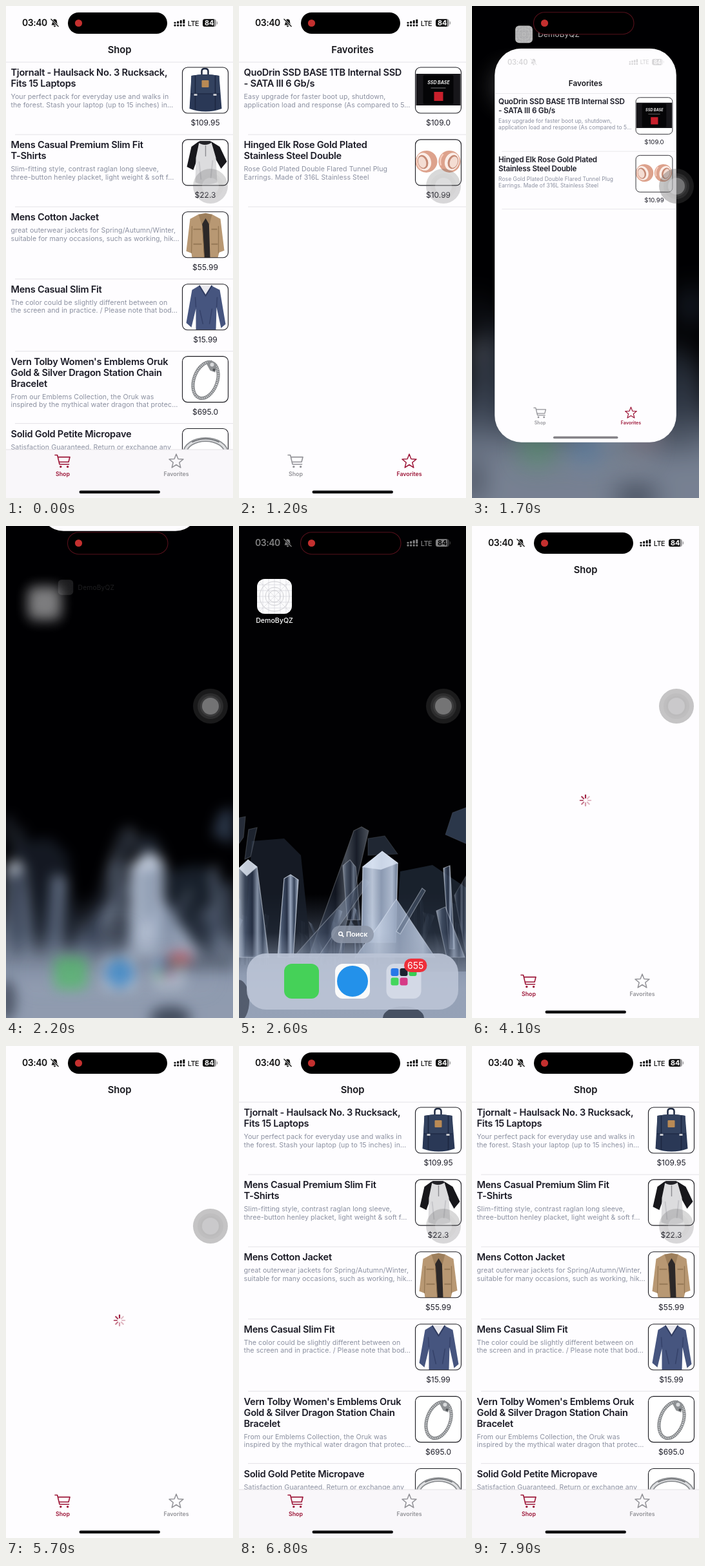
An HTML page that plays this animation: 352 px wide and 762 px high, repeating every 8 s.

```html
<!DOCTYPE html>
<html lang="en">
<head>
<meta charset="utf-8">
<title>Shop app</title>
<style>
html, body { margin: 0; width: 100%; height: 100%; overflow: hidden; background: #000; }
svg { display: block; width: 100vw; height: 100vh; font-family: Inter, sans-serif; }
.nav { font-size: 14.8px; font-weight: 600; letter-spacing: -.05px; fill: #16161c; }
.title { font-size: 14.6px; font-weight: 600; letter-spacing: -.26px; fill: #1b1b26; }
.desc { font-size: 10.6px; letter-spacing: .07px; fill: #8b90a0; }
.price { font-size: 12px; fill: #1b1b26; }
.tab { font-size: 8.8px; font-weight: 600; }
.mid { text-anchor: middle; }
</style>
</head>
<body>
<svg id="stage" viewBox="0 0 352 762" xmlns="http://www.w3.org/2000/svg"></svg>
<script>
const LOOP = 8000;
const RED = '#9c1537', GRAY = '#929297';

// Timeline, ms
const T = { fav: 1100, swipe: 1430, fling: 1980, gone: 2230, tap: 2900, open: 3524, loaded: 6300 };

const clamp = v => Math.max(0, Math.min(1, v));
const span = (t, a, b) => clamp((t - a) / (b - a));
const smooth = u => u * u * (3 - 2 * u);
const mix = (a, b, u) => a + (b - a) * u;

const text = (x, y, cls, s, extra = '') => `<text x="${x}" y="${y}" class="${cls}" ${extra}>${s}</text>`;
const path = (d, fill, extra = '') => `<path d="${d}" fill="${fill}" ${extra}/>`;
const line = (d, color, w, extra = '') => path(d, 'none', `stroke="${color}" stroke-width="${w}" ${extra}`);
const rect = (x, y, w, h, r, fill, extra = '') =>
  `<rect x="${x}" y="${y}" width="${w}" height="${h}" rx="${r}" fill="${fill}" ${extra}/>`;
const circle = (x, y, r, fill, extra = '') => `<circle cx="${x}" cy="${y}" r="${r}" fill="${fill}" ${extra}/>`;
const oval = (x, y, rx, ry, fill, extra = '') =>
  `<ellipse cx="${x}" cy="${y}" rx="${rx}" ry="${ry}" fill="${fill}" ${extra}/>`;

// Product pictures in a 71 x 71 box
const art = {
  backpack: line('M30 12V6Q30 2 35 2Q40 2 40 6V12', '#1f2a42', 2.5)
    + path('M14 13Q35 9 57 13L61 64Q36 73 11 64Z', '#2a3856')
    + path('M14 13Q35 9 57 13L58 40H13Z', '#33425f')
    + line('M20 13V66M51 13V66', '#1c2740', 1.5)
    + line('M13 41H58', '#1c2740', 1)
    + rect(30, 20, 11, 11, 1, '#b98a55')
    + rect(18, 41, 5, 3, 0, '#c3c6cc') + rect(48, 41, 5, 3, 0, '#c3c6cc'),
  raglan: path('M25 3L14 11L7 42L17 47L23 30L28 8ZM45 3L58 11L69 34L60 45L51 29L44 8Z', '#17171b')
    + path('M26 4Q35 10 45 4L52 28L54 66Q36 73 20 66L21 28Z', '#dcdcde')
    + path('M24 4Q35 12 46 4L43 2H27Z', '#232328')
    + line('M36 9V26', '#8b8b90', 1.4)
    + line('M26 34L29 62M47 32L44 60', '#c6c6ca', 2),
  jacket: path('M25 4L46 4L59 11L65 60L57 63L55 71H15L14 64L6 61L12 11Z', '#b89873')
    + path('M30 8L41 8L43 71H34Z', '#2c2828')
    + path('M25 4L36 2L46 4L42 20L36 10L30 20Z', '#9d7f5c')
    + line('M15 22L14 64M56 22L56 64', '#957854', 1.3)
    + line('M17 27H29M45 27H54M17 50H30M45 50H55', '#977a57', 2)
    + line('M31 22L34 71', '#8b6d4b', 1),
  pullover: path('M25 3L15 9L6 60L14 67L21 38L21 71H52L53 36L60 68L67 62L58 9L46 3Z', '#46557f')
    + path('M27 2L36 17L45 2Z', '#e9e9ee')
    + line('M26 2L36 18L46 2', '#303c61', 2)
    + line('M21 36L20 20M53 36L54 20M27 40L32 62M46 38L42 62', '#36436b', 1.6),
  bracelet: '<g transform="rotate(20 36 37)">'
    + oval(36, 37, 18, 29, 'none', 'stroke="#74777a" stroke-width="5"')
    + oval(36, 37, 18, 29, 'none', 'stroke="#c9cbcd" stroke-width="3.4" stroke-dasharray="1.6 1.2"') + '</g>'
    + path('M37 11L45 6L53 13L51 25L43 22Z', '#8d9093')
    + circle(46, 13, 3, '#d8dadc') + circle(49, 21, 2, '#4d5053'),
  band: oval(36, 38, 32, 21, 'none', 'stroke="#8c8f92" stroke-width="7"')
    + oval(36, 38, 32, 21, 'none', 'stroke="#dfe0e2" stroke-width="3.5"')
    + line('M15 21Q36 11 57 21', '#6b6e72', 1.5),
  drive: rect(1, 10, 69, 49, 0, '#17161a')
    + rect(12, 12, 47, 45, 2, '#050507')
    + text(36, 26, 'mid', 'SSD BASE', 'font-size="7" font-weight="700" font-style="italic" fill="#eee"')
    + line('M24 32H47', '#777', 1) + rect(29, 38, 14, 14, 0, '#c8202c'),
  plugs: [[17, -18], [53, 18]].map(([x, a]) => `<g transform="rotate(${a} ${x} 34)">`
    + oval(x, 34, 17, 17, '#dda28c') + oval(x + a / 5, 33, 11, 14, '#fbeee8')
    + oval(x + a / 3.4, 33, 8, 11, '#c58a75') + oval(x + a / 2.8, 33, 6, 9, '#f4ddd3')
    + line(`M${x - 13} 26Q${x - 17} 35 ${x - 11} 44`, '#f6cdbd', 2.5) + '</g>').join('')
};

const shop = [
  [['Tjornalt - Haulsack No. 3 Rucksack,', 'Fits 15 Laptops'],
    ['Your perfect pack for everyday use and walks in', 'the forest. Stash your laptop (up to 15 inches) in…'], '$109.95', 'backpack'],
  [['Mens Casual Premium Slim Fit', 'T-Shirts'],
    ['Slim-fitting style, contrast raglan long sleeve,', 'three-button henley placket, light weight &amp; soft f…'], '$22.3', 'raglan'],
  [['Mens Cotton Jacket'],
    ['great outerwear jackets for Spring/Autumn/Winter,', 'suitable for many occasions, such as working, hik…'], '$55.99', 'jacket'],
  [['Mens Casual Slim Fit'],
    ['The color could be slightly different between on', 'the screen and in practice. / Please note that bod…'], '$15.99', 'pullover'],
  [["Vern Tolby Women's Emblems Oruk", 'Gold &amp; Silver Dragon Station Chain', 'Bracelet'],
    ['From our Emblems Collection, the Oruk was', 'inspired by the mythical water dragon that protec…'], '$695.0', 'bracelet'],
  [['Solid Gold Petite Micropave'],
    ['Satisfaction Guaranteed. Return or exchange any', 'order within 30 days.'], '', 'band']
];
const favorites = [
  [['QuoDrin SSD BASE 1TB Internal SSD', '- SATA III 6 Gb/s'],
    ['Easy upgrade for faster boot up, shutdown,', 'application load and response (As compared to 5…'], '$109.0', 'drive'],
  [['Hinged Elk Rose Gold Plated', 'Stainless Steel Double'],
    ['Rose Gold Plated Double Flared Tunnel Plug', 'Earrings. Made of 316L Stainless Steel'], '$10.99', 'plugs']
];

function row([title, desc, price, pic], i) {
  const y = 87 + i * 111.9;
  const d = y + 40 + 17 * (title.length - 1);
  return title.map((s, k) => text(7.5, y + 21.3 + 17 * k, 'title', s)).join('')
    + desc.map((s, k) => text(7.5, d + 12.7 * k, 'desc', s)).join('')
    + `<g transform="translate(273.5 ${y + 8})">`
    + rect(0, 0, 71, 71, 8, '#fff') + `<g class="art">${art[pic]}</g>`
    + rect(0, 0, 71, 71, 8, 'none', 'stroke="#1c1c22" stroke-width="1.1"') + '</g>'
    + text(309, y + 98.2, 'price mid', price)
    + rect(14, y + 111.7, 338, .8, 0, '#dddbe0');
}

function status(c, inner) {
  let bars = '';
  for (let i = 0; i < 4; i++) {
    const x = 260.5 + i * 4.6, h = 2.5 + i * 1.3;
    bars += rect(x, 27.2 - h, 3, h, .8, c) + rect(x, 28.6, 3, 3, .8, c);
  }
  return text(25, 31.3, '', '03:40', `font-size="13.9" font-weight="600" letter-spacing="-.4" fill="${c}"`)
    + path('M70.5 29.5Q72 27.5 72 24.5Q72 20.5 75.5 20.2Q79 20.5 79 24.5Q79 27.5 80.5 29.5ZM73.7 30.5H77.3Q76.8 32.4 75.5 32.4Q74.2 32.4 73.7 30.5Z', c)
    + line('M69.5 20L81.5 32', inner, 2.6) + line('M69.5 20L81.5 32', c, 1.2)
    + bars + text(281.8, 30.6, '', 'LTE', `font-size="10.8" font-weight="500" letter-spacing="-.5" fill="${c}"`)
    + rect(305, 20.3, 21, 11.8, 3.6, c, 'opacity=".4"')
    + path('M308.6 20.3H322.5V32.1H308.6Q305 32.1 305 28.5V23.9Q305 20.3 308.6 20.3Z', c)
    + rect(326.8, 24, 1.4, 4.4, .7, c, 'opacity=".4"')
    + text(315.2, 30.2, 'mid', '84', `font-size="10.8" font-weight="700" fill="${inner}"`);
}

const star = 'M' + Array.from({ length: 10 }, (_, i) => {
  const a = -Math.PI / 2 + i * Math.PI / 5, r = i % 2 ? 5 : 11.6;
  return `${(264 + r * Math.cos(a)).toFixed(1)} ${(705.5 + r * Math.sin(a)).toFixed(1)}`;
}).join('L') + 'Z';

const tabs = (a, b) =>
  line('M76 695.5H79.6L83 709.8H97.5M80.2 698.6H99L97 706.3H82', a, 1.6, 'stroke-linejoin="round" stroke-linecap="round"')
  + circle(84.8, 713.6, 1.7, a) + circle(95.6, 713.6, 1.7, a)
  + text(88, 728, 'tab mid', 'Shop', `fill="${a}"`)
  + line(star, b, 1.5, 'stroke-linejoin="round"')
  + text(264, 728, 'tab mid', 'Favorites', `fill="${b}"`);

const spokes = Array.from({ length: 8 }, (_, i) =>
  `<path class="spoke" d="M176 421V416.8" stroke="${RED}" stroke-width="2.2" stroke-linecap="round" transform="rotate(${i * 45} 176 425)"/>`).join('');

const gridIcon = (x, y, s) => `<g transform="translate(${x} ${y}) scale(${s / 54})">`
  + rect(0, 0, 54, 54, 12, '#fbfbfc')
  + line('M9 0V54M18 0V54M27 0V54M36 0V54M45 0V54M0 9H54M0 18H54M0 27H54M0 36H54M0 45H54M3 3L51 51M51 3L3 51', '#d2d2d7', .6)
  + [9, 14, 23].map(r => circle(27, 27, r, 'none', 'stroke="#bdbdc3" stroke-width=".7"')).join('') + '</g>';

// Crystals: points, fill, opacity, edge opacity
const crystals = [
  ['20,488 70,484 96,510 112,665 8,665', '#1a212d', .8, 0],
  ['200,484 226,480 246,508 200,510', '#28313f', .8, .15],
  ['250,535 300,525 352,560 352,690 240,690', '#202937', .8, 0],
  ['352,436 331,444 320,478 352,492', '#303d52', .9, .1],
  ['0,452 10,450 7,482 0,492', '#4b586d', .5, .3],
  ['15,470 28,467 18,512 9,516', '#39465a', .5, .4],
  ['178,472 190,466 201,472 154,668 108,668', 'url(#ice)', .4, .7],
  ['161,526 172,517 181,528 188,610 168,610', 'url(#ice)', .5, .7],
  ['0,530 14,517 28,528 46,668 0,668', 'url(#ice)', .75, .8],
  ['0,530 14,517 28,528 12,542', '#eaf1fc', .8, .5],
  ['70,546 80,540 92,548 84,668 60,668', 'url(#ice)', .9, .8],
  ['194,546 202,552 122,668 84,668', 'url(#ice)', .45, .7],
  ['192,528 222,504 246,522 243,645 190,645', 'url(#pale)', .95, .8],
  ['192,528 222,504 246,522 220,532', '#dfe9f8', .75, .6],
  ['244,578 304,668 180,668 214,622', 'url(#pale)', .9, .6],
  ['284,561 289,565 250,632 244,628', '#54637b', .5, .9],
  ['317,530 327,526 334,655 326,655', 'url(#ice)', .8, .7],
  ['306,596 320,590 350,668 322,668', 'url(#ice)', .65, .6],
  ['334,572 352,542 352,662', 'url(#ice)', .4, .4]
].map(([p, f, o, e]) =>
  `<polygon points="${p}" fill="${f}" opacity="${o}" stroke="#e4edfa" stroke-opacity="${e}" stroke-width="1.2"/>`).join('');

// Small shards around the crystal feet
let seed = 11;
const rnd = () => (seed = seed * 16807 % 2147483647) / 2147483647;
const shards = Array.from({ length: 34 }, () => {
  const x = rnd() * 352, y = 575 + rnd() * 70, w = 3 + rnd() * 9, lean = (rnd() - .5) * 60;
  return `<polygon points="${x},${y} ${x + w},${y + 4} ${x + w + lean},680 ${x + lean},680" fill="url(#ice)" opacity="${.15 + rnd() * .4}"/>`;
}).join('');

const wall = rect(-60, -60, 472, 882, 0, '#010103')
  + rect(-60, 570, 472, 252, 0, 'url(#haze)') + shards + crystals
  + rect(-60, 630, 472, 192, 0, 'url(#floor)')
  + oval(0, 735, 16, 32, '#28303f', 'opacity=".6"') + oval(255, 762, 32, 18, '#323c4e', 'opacity=".8"');

const minis = [[235.5, 685, '#2878e8'], [249.5, 685, '#1c2230'], [263.5, 685, '#38cd55'],
  [235.5, 699.5, '#43d65c'], [249.5, 699.5, '#d63a86']];
const home = `<g id="dock">${rect(12, 662, 328, 87, 30, '#bcc5d6', 'opacity=".9"')}
  ${rect(143, 619, 66, 27, 13.5, '#8d97a9', 'opacity=".85"')}
  ${circle(157.5, 631.5, 2.8, 'none', 'stroke="#fff" stroke-width="1.5"')}${line('M159.6 633.6L162.4 636.4', '#fff', 1.6)}
  ${text(166, 636.3, '', 'Поиск', 'font-size="11" font-weight="600" letter-spacing="-.2" fill="#fff"')}
  ${text(55, 150, 'mid', 'DemoByQZ', 'font-size="10.6" font-weight="500" fill="#fff"')}</g>
  <g id="appIcon">${gridIcon(28, 82, 54)}</g>
  ${rect(70, 678, 54, 54, 12, '#45d158')}
  ${rect(149, 678, 54, 54, 12, '#fafafa')}${circle(176, 705, 24, '#2391ea')}
  ${rect(228.5, 678, 54, 54, 12, '#dde2ec', 'opacity=".75"')}
  ${minis.map(([x, y, c]) => rect(x, y, 12, 12, 3, c)).join('')}
  ${rect(256, 670, 35.5, 21, 10.5, '#ee2f3a')}
  ${text(273.7, 685.6, 'mid', '655', 'font-size="14" fill="#fff"')}`;

const $ = id => document.getElementById(id);
$('stage').innerHTML = `
<defs>
  <linearGradient id="ice"><stop offset="0" stop-color="#c6d3e6"/><stop offset=".2" stop-color="#4e5d76"/>
    <stop offset=".45" stop-color="#29344a"/><stop offset=".62" stop-color="#a9b8d0"/><stop offset=".8" stop-color="#3a4860"/><stop offset="1" stop-color="#bccadf"/></linearGradient>
  <linearGradient id="pale"><stop offset="0" stop-color="#8a9ab4"/><stop offset=".3" stop-color="#c3cfe2"/>
    <stop offset=".55" stop-color="#93a2bb"/><stop offset=".85" stop-color="#b7c4d9"/><stop offset="1" stop-color="#6f7f99"/></linearGradient>
  <linearGradient id="haze" x2="0" y2="1"><stop offset="0" stop-color="#4c5a72" stop-opacity="0"/><stop offset=".5" stop-color="#7d8ba3"/></linearGradient>
  <linearGradient id="floor" x2="0" y2="1"><stop offset="0" stop-color="#97a3b8" stop-opacity="0"/><stop offset=".45" stop-color="#98a4b9" stop-opacity=".9"/></linearGradient>
  <clipPath id="screen"><rect id="mask" width="352" height="762"/></clipPath>
</defs>
<g id="back">
  <g id="wall">${wall}</g>
  <g id="home">${home}</g>
  <rect id="veil" width="352" height="762"/>
  <g id="outer">${status('#fff', '#000')}</g>
</g>
<g id="label">${gridIcon(40, -44, 33.5)}${text(84, -22, '', 'DemoByQZ', 'font-size="14.7" fill="#fff" letter-spacing=".2"')}</g>
<g id="app"><g clip-path="url(#screen)">
  ${rect(0, 0, 352, 2400, 0, '#fefdff')}
  <g id="content">
    <g id="shop">${shop.map(row).join('')}${rect(0, 687, 352, 75, 0, '#f9f7fa')}${rect(0, 686.6, 352, .8, 0, '#dcdade')}</g>
    <g id="favs">${favorites.map(row).join('')}</g>
    <g id="spin">${spokes}</g>
    <g id="shopTabs">${tabs(RED, GRAY)}</g><g id="favTabs">${tabs(GRAY, RED)}</g>
    ${text(176, 73.2, 'nav mid', 'Shop', 'id="shopNav"')}${text(176, 73.2, 'nav mid', 'Favorites', 'id="favNav"')}
    <rect id="rule" y="86.6" width="352" height=".8" fill="#dddbe0"/>
    <g id="inner">${status('#111', '#fff')}</g>
  </g>
  <rect id="bar" x="113.5" width="125.5" height="4.6" rx="2.3"/>
</g></g>
${rect(96, 10, 154, 33, 16.5, '#000')}
${rect(95.5, 9.7, 155.5, 34, 17, 'none', 'id="ring" stroke="#56101b" stroke-width="1.1"')}
${circle(112.5, 26.5, 5.6, '#c4302f')}
<g id="touch">${circle(317, 279, 27, '#505050', 'opacity=".33"')}${circle(317, 279, 20, '#999', 'opacity=".14"')}
  ${circle(317, 279, 16, '#aaa', 'opacity=".12"')}${circle(317, 279, 13, '#e8e8ea', 'opacity=".33"')}</g>`;

const set = (id, attrs) => { for (const k in attrs) $(id).setAttribute(k, attrs[k]); };
const show = (id, on) => { $(id).style.display = on ? '' : 'none'; };
const spokeEls = document.querySelectorAll('.spoke');
const shopArt = document.querySelectorAll('#shop .art');

// Place of the app window: offset, scale, visible height, corner radius, and the label's resting top
function appWindow(t) {
  if (t >= T.swipe && t < T.gone) {
    const p = smooth(span(t, T.swipe, T.swipe + 443));
    const s = 1 - .3 * p, top = 114 * p ** 1.35;
    const lift = 724 * span(t, T.fling, T.gone - 10) ** 1.5;
    return { x: 176 * (1 - s), y: top - lift, s, h: 762, r: 52 * clamp(p * 12), p, top };
  }
  if (t >= T.tap && t < T.open) {
    const p = 1 - (1 - span(t, T.tap, T.open)) ** 3;
    const s = (54 + 298 * p) / 352;
    const top = 82 * (1 - p ** 3), bottom = 136 + 626 * p ** 1.2;
    return { x: 28 * (1 - p), y: top, s, h: (bottom - top) / s, r: mix(78, 52, p) * clamp((1 - p) * 20), p, top };
  }
  return { x: 0, y: 0, s: 1, h: 762, r: 0, p: 1, top: 0 };
}

function draw(t) {
  const away = t >= T.swipe && t < T.open;
  const closing = t >= T.swipe && t < T.gone;
  const opening = t >= T.tap && t < T.open;
  const w = appWindow(t);

  const fav = t >= T.fav && t < T.gone;
  const list = t < T.fav || t >= T.loaded;
  show('shop', list);
  show('favs', fav);
  show('spin', !list && !fav);
  show('rule', list || fav);
  ['shopTabs', 'shopNav'].forEach(id => show(id, !fav));
  ['favTabs', 'favNav'].forEach(id => show(id, fav));
  shopArt.forEach((el, i) => el.style.display = t < T.fav || t >= T.loaded + 100 + 60 * i ? '' : 'none');

  const head = Math.floor(t / 100) - 1;
  spokeEls.forEach((el, i) => el.setAttribute('opacity', Math.max(.28, .95 - .13 * ((head - i + 80) % 8))));

  show('app', !away || closing || opening);
  set('app', { transform: `translate(${w.x} ${w.y}) scale(${w.s})` });
  set('mask', { height: w.h, rx: w.r });
  set('content', { opacity: opening ? clamp(w.p * 2 - .5) : 1 });
  set('inner', { opacity: closing ? 1 - .84 * clamp(w.p * 2) : 1 });
  set('bar', {
    y: w.h - 11.6,
    fill: closing || opening ? '#858388' : '#0c0c0f',
    opacity: closing ? 1 - span(t, 1850, 2050) : 1
  });

  show('back', away);
  if (away) {
    const focus = t < T.tap ? smooth(span(t, 2000, 2550)) : 1 - smooth(span(t, T.tap, T.tap + 320));
    const blur = focus < 1 ? `blur(${(20 * (1 - focus) ** 2).toFixed(2)}px)` : 'none';
    const zoom = mix(.945, 1, focus);
    $('wall').style.filter = $('home').style.filter = blur;
    set('home', {
      transform: `translate(${176 * (1 - zoom)} ${381 * (1 - zoom)}) scale(${zoom})`,
      opacity: mix(.35, 1, focus)
    });
    set('dock', { opacity: focus * focus });
    set('appIcon', { opacity: opening ? 0 : t > T.tap - 100 ? .65 : 1 });
    set('veil', { opacity: t < T.tap ? .2 * (1 - span(t, 2000, 2250)) : .45 * (1 - focus) });
    set('outer', { opacity: t < T.tap ? .5 * span(t, 2250, 2500) : mix(.35, .5, focus) });
  }

  show('label', closing);
  if (closing) {
    set('label', {
      transform: `translate(${w.x} ${w.top}) scale(${w.s})`,
      opacity: .75 * span(t, 1520, 1700) * (1 - .85 * span(t, 2020, 2200))
    });
  }

  set('ring', { opacity: away ? 1 : 0 });
  set('touch', { opacity: t < T.swipe ? .65 : mix(1, .65, span(t, 6200, 6700)) });
}

function tick(now) {
  draw(now % LOOP);
  requestAnimationFrame(tick);
}
draw(0);
requestAnimationFrame(tick);
</script>
</body>
</html>
```
